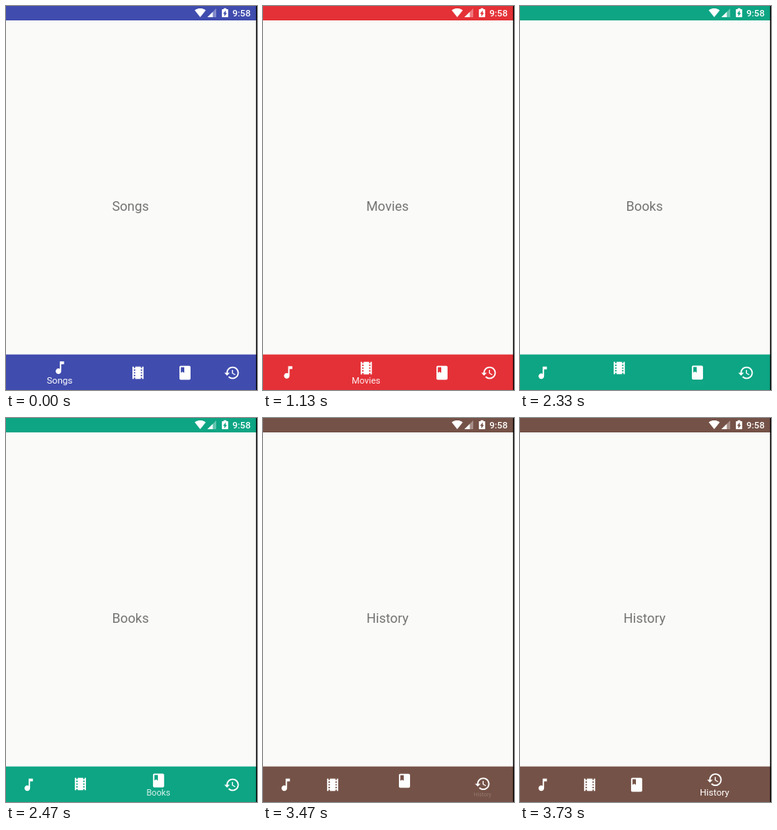
Animation of 314x480 px, one loop 3.99 s. Source, as an HTML page with a canvas:

```html
<!DOCTYPE html>
<html lang="en">
<head>
<meta charset="utf-8">
<title>Bottom navigation</title>
<style>
  html, body { margin: 0; width: 100%; height: 100%; overflow: hidden; background: #fafaf8; }
  canvas { display: block; width: 314px; height: 480px; }
</style>
</head>
<body>
<canvas id="stage"></canvas>
<script>
const W = 314, H = 480, LOOP = 3990, STEP = 65;
const FONT = 'Roboto, "Noto Sans", sans-serif';

const tabs = [
  { name: 'Songs', color: '#404cae', icon: 'M12 3v10.55c-.59-.34-1.27-.55-2-.55-2.21 0-4 1.79-4 4s1.79 4 4 4 4-1.79 4-4V7h4V3h-6z' },
  { name: 'Movies', color: '#e43137', icon: 'M18 3v2h-2V3H8v2H6V3H4v18h2v-2h2v2h8v-2h2v2h2V3h-2zM8 17H6v-2h2v2zm0-4H6v-2h2v2zm0-4H6V7h2v2zm10 8h-2v-2h2v2zm0-4h-2v-2h2v2zm0-4h-2V7h2v2z' },
  { name: 'Books', color: '#0da584', icon: 'M18 2H6c-1.1 0-2 .9-2 2v16c0 1.1.9 2 2 2h12c1.1 0 2-.9 2-2V4c0-1.1-.9-2-2-2zM6 4h5v8l-2.5-1.5L6 12V4z' },
  { name: 'History', color: '#755247', icon: 'M13 3c-4.97 0-9 4.03-9 9H1l3.89 3.89.07.14L9 12H6c0-3.87 3.13-7 7-7s7 3.13 7 7-3.13 7-7 7c-1.93 0-3.68-.79-4.94-2.06l-1.42 1.42C8.27 19.99 10.51 21 13 21c4.97 0 9-4.03 9-9s-4.03-9-9-9zm-1 5v5l4.28 2.54.72-1.21-3.5-2.08V8H12z' }
];
for (const tab of tabs) tab.path = new Path2D(tab.icon);

const wifi = new Path2D('M12 21.5L23.64 7c-.45-.34-4.93-4-11.64-4C5.28 3 .81 6.66.36 7z');
const signal = new Path2D('M2 22h20V2z');
const signalLevel = new Path2D('M14 22V10L2 22z');
const battery = new Path2D('M15.67 4H14V2h-4v2H8.33C7.6 4 7 4.6 7 5.33v15.33C7 21.4 7.6 22 8.33 22h7.33c.74 0 1.34-.6 1.34-1.33V5.33C17 4.6 16.4 4 15.67 4zM11 20v-5.5H9L13 7v5.5h2L11 20z');

// Tab changes: start time, time already run at the first step, full duration
const switches = [
  { at: 1000, lead: 0, dur: 195 },
  { at: 2330, lead: 40, dur: 300 },
  { at: 3470, lead: 80, dur: 340 }
];

const canvas = document.getElementById('stage');
const ctx = canvas.getContext('2d');
const ratio = window.devicePixelRatio || 1;
canvas.width = W * ratio;
canvas.height = H * ratio;

const lerp = (a, b, p) => a + (b - a) * p;

// cubic-bezier(.4, 0, .2, 1)
function ease(x) {
  if (x <= 0) return 0;
  if (x >= 1) return 1;
  let lo = 0, hi = 1;
  for (let i = 0; i < 20; i++) {
    const s = (lo + hi) / 2, r = 1 - s;
    if (1.2 * s * r * r + 0.6 * s * s * r + s * s * s < x) lo = s; else hi = s;
  }
  return lo * lo * (3 - 2 * lo);
}

function shape(path, x, y, sx, sy = sx, alpha = 1) {
  ctx.save();
  ctx.translate(x, y);
  ctx.scale(sx, sy);
  ctx.globalAlpha = alpha;
  ctx.fill(path, 'evenodd');
  ctx.restore();
}

function text(str, x, y, size, align = 'center', weight = 400) {
  ctx.font = `${weight} ${size}px ${FONT}`;
  ctx.textAlign = align;
  ctx.fillText(str, x, y);
}

const tabX = (i, active) => 67.4 + 58.75 * i + 39 * Math.sign(i - active);

function stateAt(t) {
  let active = 0, p = 1;
  switches.forEach((s, i) => {
    if (t < s.at) return;
    const run = Math.floor((t - s.at) / STEP) * STEP + s.lead;
    active = i + 1;
    p = ease(run / s.dur);
  });
  return { active, prev: p < 1 ? active - 1 : active, p };
}

function statusBar() {
  shape(wifi, 235.8, 1.1, 0.6);
  shape(signal, 250.9, 1.9, 0.55, 0.55, 0.35);
  shape(signalLevel, 250.9, 1.9, 0.55);
  shape(battery, 264.4, 1.7, 0.8, 0.56);
  text('9:58', 283.2, 13, 11.6, 'left', 500);
}

function navItem(i, { active, prev, p }) {
  const tab = tabs[i];
  const x = lerp(tabX(i, prev), tabX(i, active), p);
  const lift = lerp(+(i === prev), +(i === active), p);
  shape(tab.path, x - 10.44, lerp(458.5, 452.2, lift) - 10.44, 0.87);
  if (i !== active) return;
  ctx.save();
  ctx.globalAlpha = p;
  ctx.translate(x, lerp(473, 472, p));
  ctx.scale(0.5 + p / 2, 0.5 + p / 2);
  text(tab.name, -0.3, 0, 11.6);
  ctx.restore();
}

function draw(t) {
  const state = stateAt(t);
  const tab = tabs[state.active];
  ctx.setTransform(ratio, 0, 0, ratio, 0, 0);
  ctx.fillStyle = '#fafaf8';
  ctx.fillRect(0, 0, W, H);
  ctx.fillStyle = tab.color;
  ctx.fillRect(0, 0, W, 18);
  ctx.fillRect(0, 435.6, W, H);
  ctx.fillStyle = '#737373';
  text(tab.name, 155.7, 256.2, 16.5);
  ctx.fillStyle = '#fff';
  statusBar();
  tabs.forEach((_, i) => navItem(i, state));
  ctx.fillStyle = '#000';
  ctx.fillRect(312.8, 0, 1.2, H);
}

const start = performance.now();
function frame() {
  draw((performance.now() - start) % LOOP);
  requestAnimationFrame(frame);
}
frame();
</script>
</body>
</html>
```
